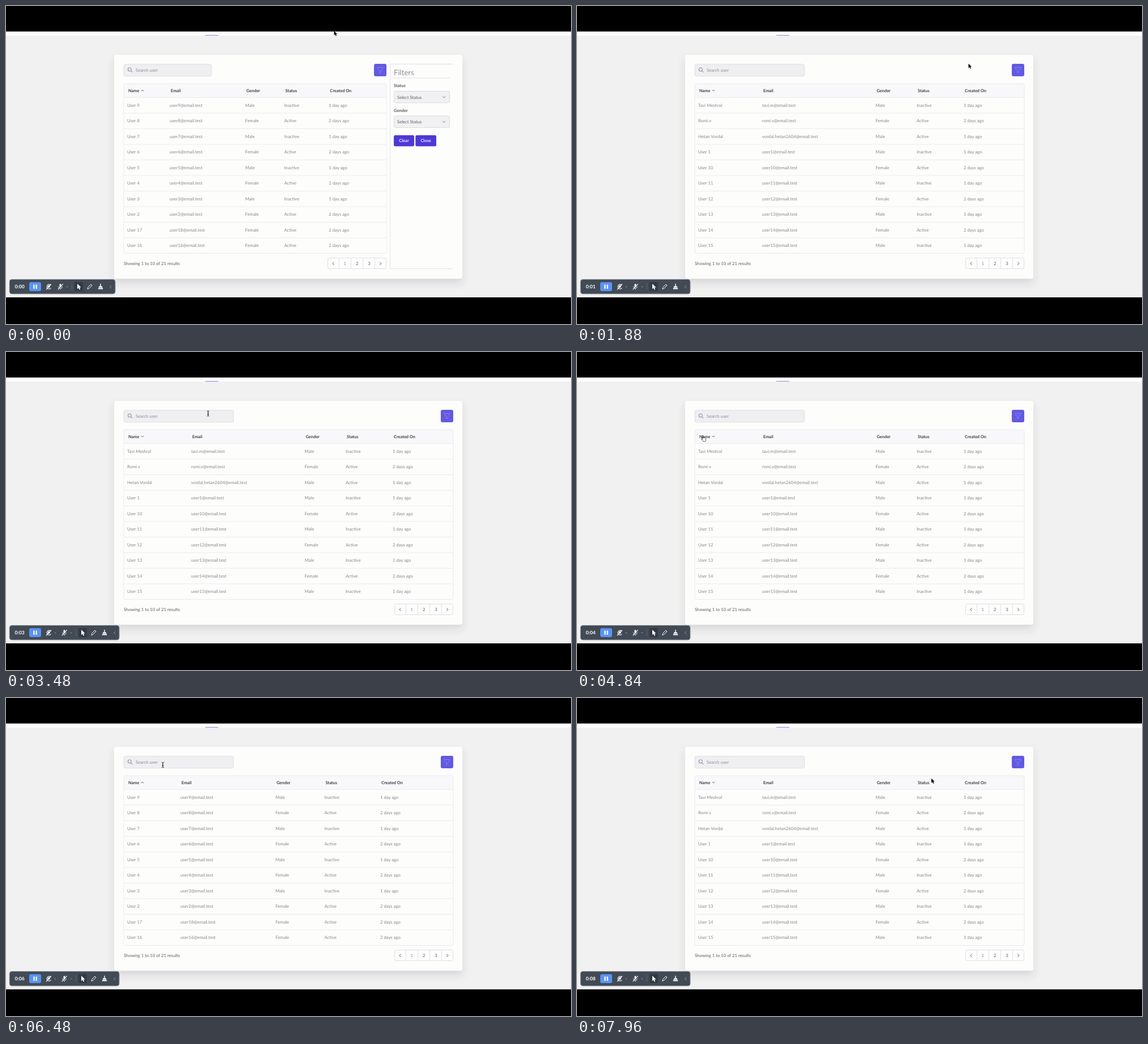
Write an HTML page that moves like this. It is 998 px wide and 561 px high and loops after 8 s.

```html
<!DOCTYPE html>
<html lang="en">
<head>
<meta charset="utf-8">
<title>User table</title>
<style>
  html, body { margin: 0; width: 100%; height: 100%; overflow: hidden; background: #000; }
  svg { display: block; width: 998px; height: 561px; }
  text { font: 7.7px Lato, "Open Sans", sans-serif; text-rendering: geometricPrecision; fill: #86878d; white-space: pre; }
  .head { font-size: 7.4px; font-weight: 700; fill: #3b3d45; }
  .label { font-size: 7.5px; font-weight: 700; fill: #555861; }
  .btn { font-size: 7.5px; font-weight: 700; fill: #f2f0ff; }
  .dark { fill: #5b5d65; }
  .title { font-size: 13.2px; fill: #8b8d95; }
  .time { font-size: 8.6px; font-weight: 700; fill: #fff; }
  .line { fill: none; stroke: #e6e6ee; stroke-width: 1; }
  .icon { fill: none; stroke-linecap: round; stroke-linejoin: round; }
</style>
</head>
<body>
<svg id="stage" viewBox="0 0 998 561" xmlns="http://www.w3.org/2000/svg"></svg>
<script>
const LOOP = 8000, STEP = 40;

const rect = (x, y, w, h, fill, r = 0, extra = '') =>
  `<rect x="${x}" y="${y}" width="${w}" height="${h}" rx="${r}" fill="${fill}" ${extra}/>`;
const text = (x, y, s, cls = '', extra = '') => `<text x="${x}" y="${y}" class="${cls}" ${extra}>${s}</text>`;
const line = (d, color = '#e6e6ee') => `<path class="line" d="${d}" style="stroke:${color}"/>`;
const icon = (d, color, w = 1, extra = '') =>
  `<path class="icon" d="${d}" stroke="${color}" stroke-width="${w}" ${extra}/>`;
const at = (x, y, s) => `<g transform="translate(${x} ${y})">${s}</g>`;
const box = (x, y, w, h, fill, stroke, r = 3) => rect(x, y, w, h, fill, r, `stroke="${stroke}"`);

// Each row: name, mailbox, gender initial, optional active flag
const mail = name => name.toLowerCase().replace(' ', '');
const users = (list, women) => list.map(n => [`User ${n}`, mail(`User ${n}`), women.includes(n) ? 'F' : 'M']);
const ascending = [
  ['Tavi Meshral', 'tavi.m', 'M'],
  ['Romi v', 'romi.v', 'F'],
  ['Hetan Vordal', 'vordal.hetan2604', 'M', true],
  ...users([1, 10, 11, 12, 13, 14, 15], [10, 12, 14])
];
const descending = users([9, 8, 7, 6, 5, 4, 3, 2, 17, 16], [8, 6, 4, 2, 17, 16]);
descending[8][1] = 'user18';

const layouts = {
  open:   { rows: descending, up: true,  right: 672, search: 155, cols: [214, 289, 422.5, 491.5, 570.3] },
  asc:    { rows: ascending,  up: false, right: 790, search: 194, cols: [214, 327, 527.5, 600, 683] },
  desc:   { rows: descending, up: true,  right: 790, search: 194, cols: [214, 308, 476, 562.5, 661] }
};

function table({ rows, up, right, cols }) {
  const width = right - 208;
  let s = rect(208, 137, width, 25, '#f8f8fa', 3);
  ['Name', 'Email', 'Gender', 'Status', 'Created On'].forEach((h, i) => s += text(cols[i] + 2, 151.6, h, 'head'));
  s += icon(up ? 'M239 150l2-2 2 2' : 'M239 148l2 2 2-2', '#55565d', 0.9);
  rows.forEach(([name, box, sex, active], i) => {
    const y = 177.9 + 27.5 * i, woman = sex === 'F';
    const cells = [name, `${box}@email.test`, woman ? 'Female' : 'Male',
      woman || active ? 'Active' : 'Inactive', woman ? '2 days ago' : '1 day ago'];
    s += line(`M208 ${161.5 + 27.5 * i}h${width}`, '#ececf2');
    cells.forEach((c, k) => s += text(cols[k], y, c));
  });
  return s + rect(208, 137, width, 299.5, 'none', 3, 'stroke="#ebebf0"');
}

function pager(right) {
  const x = right - 104;
  let s = box(0.5, 444.5, 103, 19, '#fdfdfd', '#dfdfe3');
  [20.5, 41.5, 62.5, 83.5].forEach(d => s += line(`M${d} 444.5v19`, '#e2e2e6'));
  ['1', '2', '3'].forEach((n, i) =>
    s += text(30.8 + 21.4 * i, 457.2, n, i ? 'dark' : '', 'text-anchor="middle"'));
  s += icon('M11.2 452l-2.3 2.4 2.3 2.4M92.6 452l2.3 2.4-2.3 2.4', '#55575e');
  return at(x, 0, s);
}

function select(label, y) {
  return text(685, y, label, 'label') + box(685.5, y + 7, 98, 20.5, '#f1f1f3', '#dadae0') +
    text(691, y + 20.2, 'Select Status', 'dark') + icon(`M771.5 ${y + 16.2}l2.4 2.4 2.4-2.4`, '#777982');
}

function filters() {
  return line('M789 102.5H678.5V463.5H789', '#e3e3ea') + text(685, 122.2, 'Filters', 'title') +
    line('M685 127h99', '#dfdfd9') + select('Status', 143.3) + select('Gender', 186.9) +
    rect(685, 228, 36, 19.5, '#4e39d8', 2.5) + text(703, 240.3, 'Clear', 'btn', 'text-anchor="middle"') +
    rect(723.3, 228, 36.7, 19.5, '#4e39d8', 2.5) + text(741.6, 240.3, 'Close', 'btn', 'text-anchor="middle"');
}

function scene(id) {
  const l = layouts[id];
  return `<g id="${id}">` + box(208, 102.8, l.search, 21, '#efeff1', '#dfdfe7') +
    icon('M221.4 112a3 3 0 1 1-6 0a3 3 0 1 1 6 0M220.7 114.3l2.3 2.4', '#8f92aa', 1.1) +
    text(229, 115.7, 'Search user', '', 'style="fill:#8b8d99"') +
    rect(l.right - 22, 102, 22, 22, '#6359e2', 3) +
    at(l.right - 11, 113, icon('M-4.8-4.6h9.6v1.7L1.3.8v2.8l-2.6 1.4V.8l-3.5-3.7z', '#938cea', 0.8)) +
    table(l) + text(208, 457.2, 'Showing 1 to 10 of 21 results', 'dark') + pager(l.right) +
    (id === 'open' ? filters() : '') + '</g>';
}

const arrow = 'M0 0v9.2l2.1-2 1.5 3.4 1.7-.7-1.5-3.3h2.9z';

function toolbar(id, shift) {
  const caret = x => `<path d="M${x - 1.5} 494.8h3l-1.5 1.8z" fill="#969aa3"/>`;
  const tools = rect(121, 487, 15, 16, '#343a44', 2) +
    `<path d="${arrow}" transform="translate(126 490)" fill="#fff"/>` +
    line('M116.5 489v12', '#5f636c') +
    icon('M144 499l.8-2.8 5.2-5.2 2 2-5.2 5.2z', '#fff', 1, 'fill="#fff"') +
    icon('M167 490.5v3.5', '#fff', 1.4) +
    '<path d="M164.5 494.3h5l2 5.2h-9z" fill="#fff"/>' +
    icon('M163.5 497h7', '#424a55', 0.7) +
    icon('M186 493l-2.4 2.3 2.4 2.3', '#9a9da5', 0.9);
  const camera = icon('M79 492.4a4 4 0 1 0 0 5.6', '#e9eaec', 1.2) +
    '<circle cx="75.6" cy="494.8" r="2.2" fill="#e9eaec"/>' + icon('M71.3 499.8l8.2-9', '#fff', 1.2);
  const mic = icon('M96 491.6v3.4', '#eee', 3) + icon('M92.6 495a3.4 3.4 0 0 0 6.8 0M96 498.5v1.6', '#eee', 0.9) +
    icon('M92 499.8l8.4-9.2', '#fff', 1.1);
  return `<g id="${id}">` + box(6.3, 482.4, 186.6 + shift, 25.4, '#424a55', '#737880', 4) +
    rect(41, 487.3, 21, 15.8, '#5a94f2', 3) + rect(48.3, 491.5, 2.2, 7.4, '#fff') + rect(52.6, 491.5, 2.2, 7.4, '#fff') +
    camera + (shift ? caret(87) : '') + at(shift, 0, mic + caret(108) + tools) + '</g>';
}

const pointers =
  `<g id="arrow"><path d="${arrow}" transform="scale(.84)" fill="#000" stroke="#fff" stroke-width=".9" paint-order="stroke"/></g>` +
  '<g id="beam">' + icon('M-1.8-4.6q1.8 0 1.8 1.2v6.8q0 1.2-1.8 1.2M1.8-4.6q-1.8 0-1.8 1.2v6.8q0 1.2 1.8 1.2M-1 1h2', '#333', 0.9) + '</g>' +
  '<g id="hand">' + icon('M-.9 6V0q0-1 .8-1t.9 1v3.2q.8-.6 1.5.1.8-.5 1.4.2 1-.3 1.3.6V7q0 1.4-1 2.7H.2Q-.8 8-2.7 5.8q-.5-1 .4-1.2.7 0 1.4 1.4z',
    '#444', 0.8, 'fill="#fff"') + '</g>';

const stage = document.getElementById('stage');
stage.innerHTML =
  '<defs><filter id="shadow" x="-10%" y="-10%" width="120%" height="125%">' +
  '<feDropShadow dx="0" dy="8" stdDeviation="7" flood-color="#40404c" flood-opacity=".14"/></filter></defs>' +
  rect(0, 45, 998, 470, '#f1f1f1') + rect(0, 45, 998, 7, '#fff') + rect(352, 51, 23, 1.2, '#9d95ec') +
  rect(191, 86, 615, 395, '#fdfdfc', 4, 'filter="url(#shadow)"') +
  Object.keys(layouts).map(scene).join('') +
  toolbar('narrow', 0) + toolbar('wide', 7) + text(15.6, 498, '', 'time', 'id="clock"') +
  `<g id="pointer">${pointers}</g>` +
  rect(0, 0, 998, 45, '#000') + rect(0, 514, 998, 47, '#000');

// Pointer stops: time, x, y
const path = [
  [0, 579.5, 44], [360, 650, 108], [640, 602, 56], [720, 594, 25], [1480, 650, 25], [1600, 662, 52],
  [1880, 691.5, 101.7], [2300, 772, 112], [2640, 764, 117], [3100, 480, 124], [3480, 357, 108.5],
  [3600, 357, 108.5], [4080, 300, 116], [4400, 258, 131], [4840, 222.5, 148], [5760, 225, 149],
  [6160, 230, 149], [6480, 277, 118], [6640, 277, 118], [6960, 225, 149], [7440, 232, 149],
  [7960, 626, 142], [8000, 626, 142]
];
const RELOAD = 1360, SORT_DOWN = 5680, SORT_UP = 7240;

const el = id => document.getElementById(id);
const show = (ids, active) => ids.forEach(id => el(id).style.display = id === active ? '' : 'none');
const inside = (x, y, l, t, r, b) => x >= l && x <= r && y >= t && y <= b;

function pointerAt(t) {
  const i = Math.max(1, path.findIndex(p => p[0] >= t));
  const [t0, x0, y0] = path[i - 1], [t1, x1, y1] = path[i];
  const u = (t - t0) / (t1 - t0), k = u * u * (3 - 2 * u);
  return [x0 + (x1 - x0) * k, y0 + (y1 - y0) * k];
}

function draw(t) {
  const view = t < RELOAD ? 'open' : t >= SORT_DOWN && t < SORT_UP ? 'desc' : 'asc';
  const { right, search } = layouts[view];
  const [x, y] = pointerAt(t);
  const overSearch = inside(x, y, 208, 102, 208 + search, 124);
  const overLink = inside(x, y, 215, 144, 244, 154) || inside(x, y, right - 22, 102, right, 124);
  show(Object.keys(layouts), view);
  show(['narrow', 'wide'], view === 'open' ? 'narrow' : 'wide');
  show(['arrow', 'beam', 'hand'], overSearch ? 'beam' : overLink ? 'hand' : 'arrow');
  el('pointer').setAttribute('transform', `translate(${x} ${y})`);
  el('clock').textContent = `0:0${Math.floor((t + 80) / 1000)}`;
}

const start = performance.now();
function tick() {
  const t = (performance.now() - start) % LOOP;
  draw(Math.floor(t / STEP) * STEP);
  requestAnimationFrame(tick);
}
tick();
</script>
</body>
</html>
```
